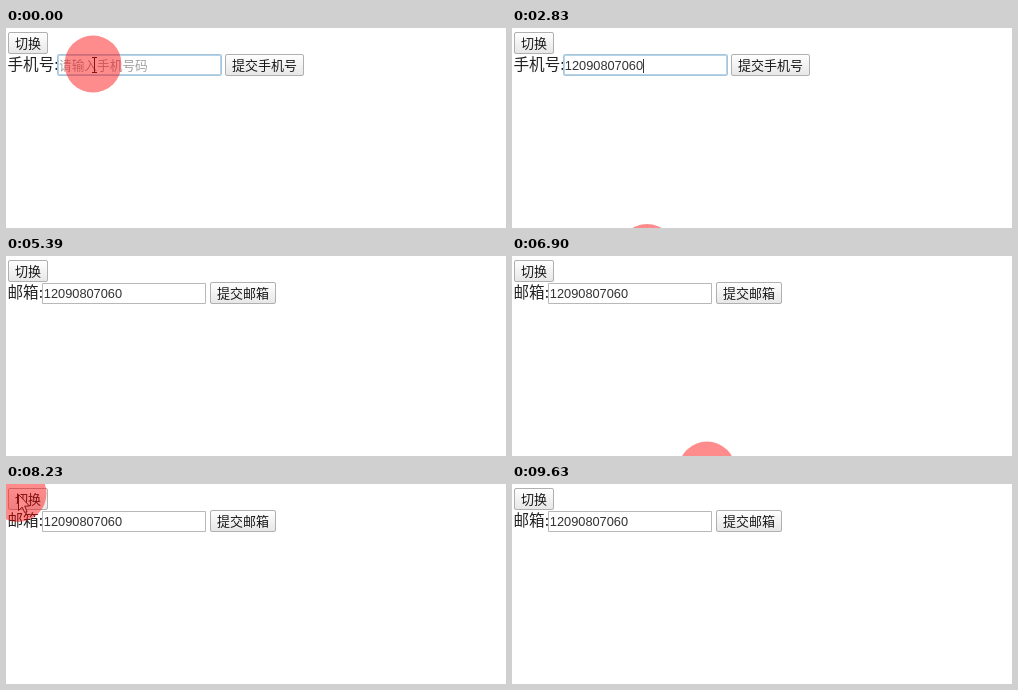
An HTML page with a canvas for the animation above (9730 ms loop, 500 by 200 pixels).

```html
<!DOCTYPE html>
<html lang="zh">
<head>
<meta charset="utf-8">
<title>切换</title>
<style>
  html, body { margin: 0; width: 100%; height: 100%; overflow: hidden; background: #fff; }
  canvas { display: block; width: 500px; height: 200px; }
</style>
</head>
<body>
<canvas id="stage" width="500" height="200"></canvas>
<script>
const ctx = document.getElementById('stage').getContext('2d');
const LOOP = 9730;
const NUMBER = '12090807060';
const CJK = '"Noto Sans CJK SC", "Noto Sans CJK", sans-serif';
const SANS = '"Liberation Sans", Arial, sans-serif';
const TYPE_START = 70, TYPE_STEP = 68, BLINK = 336;
const TYPE_END = TYPE_START + TYPE_STEP * (NUMBER.length - 1);
const FIRST_CLICK = 4400;
const LABEL_SIZE = 15.6, BUTTON_SIZE = 13, INPUT_WIDTH = 164, RADIUS = 28.5;

const FORMS = {
  phone: { label: '手机号:', submit: '提交手机号' },
  email: { label: '邮箱:', submit: '提交邮箱' }
};

// The pointer rests between moves.
const HOME = { x: 87, y: 36 };
const MOVES = [
  { from: 870, to: 1480, x: 17, y: 114 },
  { from: 1510, to: 1800, x: 95, y: 232 },
  { from: 2400, to: 2830, x: 135, y: 224.5 },
  { from: 2900, to: 3270, x: 169, y: 232 },
  { from: 3670, to: 4160, x: 27, y: 21.5 },
  { from: 4400, to: 4630, x: 110, y: 235 },
  { from: 6600, to: 6900, x: 195, y: 214 },
  { from: 6900, to: 7690, x: 35, y: 32 },
  { from: 7760, to: 8200, x: 12, y: 9.5 },
  { from: 9000, to: 9410, x: 4, y: -34 }
];

const clamp = (v, lo, hi) => Math.max(lo, Math.min(hi, v));
const ease = k => k * k * (3 - 2 * k);

function pointerAt(t) {
  let { x, y } = HOME;
  for (const move of MOVES) {
    const k = ease(clamp((t - move.from) / (move.to - move.from), 0, 1));
    x += (move.x - x) * k;
    y += (move.y - y) * k;
  }
  return { x, y };
}

function formAt(t) {
  const phone = t < FIRST_CLICK || (t >= 8450 && t < 8950);
  return phone ? FORMS.phone : FORMS.email;
}

function text(str, x, y, size, color, family = CJK) {
  ctx.font = `${size}px ${family}`;
  ctx.fillStyle = color;
  ctx.fillText(str, x, y);
}

function box(x, y, w, h, stroke, fill, radius = 0) {
  ctx.beginPath();
  ctx.roundRect(x + 0.5, y + 0.5, w - 1, h - 1, radius);
  if (fill) {
    ctx.fillStyle = fill;
    ctx.fill();
  }
  ctx.strokeStyle = stroke;
  ctx.lineWidth = 1;
  ctx.stroke();
}

function button(x, y, label) {
  const fill = ctx.createLinearGradient(0, y, 0, y + 22);
  fill.addColorStop(0, '#fff');
  fill.addColorStop(1, '#e6e6e6');
  box(x, y, label.length * BUTTON_SIZE + 14, 22, '#b0b0b0', fill, 1.5);
  text(label, x + 7, y + 16, BUTTON_SIZE, '#181818');
}

function input(x, t) {
  const focused = t < FIRST_CLICK;
  if (focused) {
    box(x, 26, INPUT_WIDTH + 1, 22, '#a3c6de', null, 1.5);
    box(x + 1, 27, INPUT_WIDTH - 1, 20, '#b9d3e4');
  } else {
    box(x, 27, INPUT_WIDTH, 21, '#b8b8b8');
  }
  const count = clamp(Math.floor((t - TYPE_START) / TYPE_STEP) + 1, 0, NUMBER.length);
  if (!count) {
    text('请输入手机号码', x + 2, 42, 12.7, '#a0a0a0');
    return;
  }
  const typed = NUMBER.slice(0, count);
  text(typed, x + 1.8, 42, 12.8, '#333', SANS);
  const caretOn = t < TYPE_END || Math.floor((t - TYPE_END) / BLINK) % 2 === 0;
  if (focused && caretOn) {
    ctx.fillStyle = '#333';
    ctx.fillRect(Math.round(x + 1.8 + ctx.measureText(typed).width), 31, 1, 14);
  }
}

function arrow(x, y) {
  ctx.save();
  ctx.translate(x + 0.5, y + 0.5);
  ctx.fillStyle = '#fff';
  ctx.strokeStyle = '#222';
  ctx.lineWidth = 1;
  const shape = new Path2D('M0 0V16L3.7 12.6L6.2 18L8.6 17L6.2 11.7L11 11.5Z');
  ctx.fill(shape);
  ctx.stroke(shape);
  ctx.restore();
}

function iBeam(x, y) {
  ctx.fillStyle = '#222';
  ctx.fillRect(x, y - 6, 1, 14);
  ctx.fillRect(x - 2, y - 7, 5, 1);
  ctx.fillRect(x - 2, y + 8, 5, 1);
}

function pointer(t) {
  const { x, y } = pointerAt(t);
  const overInput = x > 51 && y > 27 && y < 47;
  const hiddenByTyping = t >= TYPE_START && t < MOVES[0].from;
  if (!overInput) arrow(Math.round(x), Math.round(y));
  else if (!hiddenByTyping) iBeam(Math.round(x) + 1, Math.round(y));
  ctx.fillStyle = 'rgba(255, 0, 0, 0.45)';
  ctx.beginPath();
  ctx.arc(x, y, RADIUS, 0, Math.PI * 2);
  ctx.fill();
}

function draw(t) {
  const { label, submit } = formAt(t);
  const inputX = 5 + LABEL_SIZE * (label.length - 1) | 0;
  ctx.fillStyle = '#fff';
  ctx.fillRect(0, 0, 500, 200);
  button(2, 4, '切换');
  text(label, 1.5, 42, LABEL_SIZE, '#222');
  input(inputX, t);
  button(inputX + INPUT_WIDTH + 4, 26, submit);
  pointer(t);
}

const start = performance.now();
function tick() {
  draw((performance.now() - start) % LOOP);
  requestAnimationFrame(tick);
}
tick();
</script>
</body>
</html>
```
